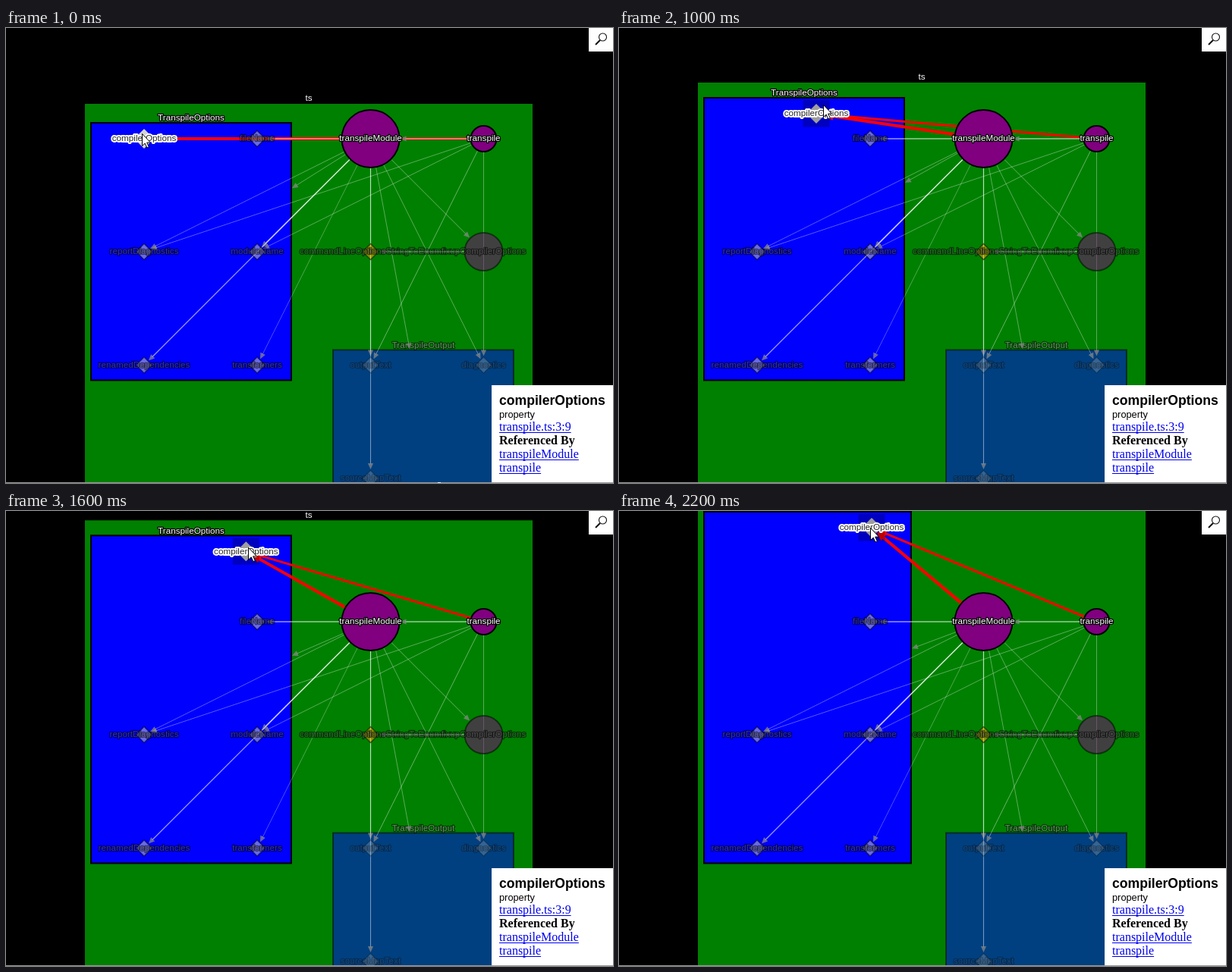
Recreate the animation shown at these times as an HTML page with a canvas. Size 800 by 600 pixels, loop 2.7 s.

```html
<!DOCTYPE html>
<html lang="en">
<head>
<meta charset="utf-8">
<title>Dependency graph</title>
<style>
  html, body { margin: 0; width: 800px; height: 600px; overflow: hidden; background: #000; }
  canvas { display: block; }
</style>
</head>
<body>
<canvas id="stage" width="800" height="600"></canvas>
<script>
const ctx = document.getElementById('stage').getContext('2d');
const SANS = '"Liberation Sans", Arial, sans-serif';
const SERIF = '"Liberation Serif", "Times New Roman", serif';
const LOOP = 2700, STEP = 100;

// time, dragged node x/y, pointer x/y
const KEYS = [
  [0, 182, 146, 179, 139], [200, 182, 146, 180, 147], [600, 182, 146, 180, 147],
  [1000, 260, 113, 269, 101], [1100, 260, 113, 269, 101], [1200, 274, 98, 288, 79],
  [1400, 309, 63, 313, 57], [1500, 309, 63, 313, 57], [1800, 331, 34, 331, 29],
  [1900, 331, 34, 331, 29], [2200, 333, 22, 331, 22], [LOOP, 333, 22, 331, 22]
];

const COL = [182, 331, 480.5, 629.5], ROW = [146, 295, 444.5, 594];
const circle = (label, c, r, size, alpha = 1) =>
  ({ label, x: COL[c], y: ROW[r], size, alpha, fill: 'purple', round: true });
const diamond = (label, c, r, alpha = 0.5, fill = 'lightgrey') =>
  ({ label, x: COL[c], y: ROW[r], size: 10.5, alpha, fill });

const dragged = diamond('compilerOptions', 0, 0, 1);
const fileName = diamond('fileName', 1, 0);
const report = diamond('reportDiagnostics', 0, 1);
const moduleName = diamond('moduleName', 1, 1);
const renamed = diamond('renamedDependencies', 0, 2);
const transformers = diamond('transformers', 1, 2);
const outputText = diamond('outputText', 2, 2, 0.25);
const diagnostics = diamond('diagnostics', 3, 2, 0.25);
const sourceMap = diamond('sourceMapText', 2, 3, 0.25);
const enumMap = diamond('commandLineOptionsStringToEnum', 2, 1, 0.5, 'orange');
const fixup = circle('fixupCompilerOptions', 3, 1, 25, 0.5);
const main = circle('transpileModule', 2, 0, 38);
const transpile = circle('transpile', 3, 0, 17);
const nodes = [fileName, report, moduleName, renamed, transformers, outputText,
  diagnostics, sourceMap, enumMap, fixup, main, transpile];

const options = { label: 'TranspileOptions', left: 112, bottom: 464.5 };
const output = { label: 'TranspileOutput', left: 431, right: 669, top: 424.5, bottom: 615 };

// from, to, line opacity, line width
const edges = [
  [main, fileName, 0.6, 1.3], [main, report, 0.35, 1], [main, moduleName, 0.65, 1.3],
  [main, renamed, 0.6, 1.2], [main, transformers, 0.3, 1], [main, options, 0.35, 1],
  [main, outputText, 0.5, 1.2], [main, sourceMap, 0.45, 1.1], [main, output, 0.35, 1],
  [main, diagnostics, 0.35, 1], [main, fixup, 0.4, 1], [transpile, main, 0.6, 1.3],
  [transpile, report, 0.35, 1], [transpile, moduleName, 0.35, 1],
  [transpile, outputText, 0.4, 1], [transpile, diagnostics, 0.35, 1],
  [fixup, enumMap, 0.45, 2]
];

function pose(t) {
  const i = KEYS.findIndex(k => k[0] > t), a = KEYS[i - 1], b = KEYS[i];
  const p = (t - a[0]) / (b[0] - a[0]);
  return a.map((v, j) => v + (b[j] - v) * p);
}

function label(text, x, y, alpha = 1, ink = 1, fill = '#fff', halo = '#000', width = 2.4) {
  ctx.font = `11.7px ${SANS}`;
  ctx.textAlign = 'center';
  ctx.textBaseline = 'middle';
  ctx.lineJoin = 'round';
  ctx.lineWidth = width;
  ctx.strokeStyle = halo;
  ctx.fillStyle = fill;
  ctx.globalAlpha = alpha;
  ctx.strokeText(text, x, y);
  ctx.globalAlpha = alpha * ink;
  ctx.fillText(text, x, y);
  ctx.globalAlpha = 1;
}

function drawGroup(g, alpha) {
  ctx.globalAlpha = alpha;
  ctx.fillStyle = '#00f';
  ctx.strokeStyle = '#000';
  ctx.lineWidth = 2;
  ctx.lineJoin = 'miter';
  ctx.fillRect(g.left, g.top, g.right - g.left, g.bottom - g.top);
  ctx.strokeRect(g.left, g.top, g.right - g.left, g.bottom - g.top);
  label(g.label, (g.left + g.right) / 2, g.top - 6, alpha, alpha < 1 ? 0.8 : 1);
}

function polygon(points) {
  ctx.beginPath();
  points.forEach(([x, y]) => ctx.lineTo(x, y));
  ctx.closePath();
}

// Distance from a shape's centre to its rim along a unit direction
function rim(s, ux, uy) {
  if (s.left) return Math.min((s.right - s.left) / 2 / Math.abs(ux), (s.bottom - s.top) / 2 / Math.abs(uy)) + 1;
  return s.round ? s.size + 1 : (s.size + 1.5) / (Math.abs(ux) + Math.abs(uy));
}

function drawEdge(from, to, color, alpha, width, headColor, head) {
  const tx = to.left ? (to.left + to.right) / 2 : to.x;
  const ty = to.left ? (to.top + to.bottom) / 2 : to.y;
  const dx = tx - from.x, dy = ty - from.y, d = Math.hypot(dx, dy);
  const ux = dx / d, uy = dy / d;
  const start = rim(from, ux, uy), end = d - rim(to, ux, uy);
  const at = (s, side = 0) => [from.x + ux * s - uy * side, from.y + uy * s + ux * side];
  ctx.globalAlpha = alpha;
  ctx.strokeStyle = color;
  ctx.lineWidth = width;
  ctx.beginPath();
  ctx.moveTo(...at(start));
  ctx.lineTo(...at(end - head * 0.8));
  ctx.stroke();
  ctx.globalAlpha = Math.max(alpha, 0.75);
  ctx.fillStyle = headColor;
  polygon([at(end), at(end - head, head * 0.45), at(end - head, -head * 0.45)]);
  ctx.fill();
  ctx.globalAlpha = 1;
}

function nodePath({ x, y, round }, r) {
  if (round) {
    ctx.beginPath();
    ctx.arc(x, y, r, 0, 7);
  } else polygon([[x, y - r], [x + r, y], [x, y + r], [x - r, y]]);
}

function drawNode(n) {
  ctx.globalAlpha = n.alpha;
  ctx.fillStyle = n.fill;
  ctx.strokeStyle = '#000';
  ctx.lineWidth = n.round ? 2 : 1.5;
  ctx.lineJoin = 'miter';
  nodePath(n, n.size);
  ctx.fill();
  ctx.stroke();
  label(n.label, n.x, n.y, n.alpha, n.alpha < 1 ? 0.4 : 1);
}

function drawDragged(active) {
  const { x, y } = dragged;
  ctx.fillStyle = dragged.fill;
  nodePath(dragged, 13);
  ctx.fill();
  if (active) {
    ctx.fillStyle = 'rgba(0,0,0,.25)';
    ctx.fillRect(x - 17.5, y - 17.5, 35, 35);
  }
  label(dragged.label, x, y, 1, 0.85, '#000', '#fff', 4);
}

function panelText(text, baseline, font, link) {
  ctx.font = font;
  ctx.fillStyle = link ? '#00e' : '#000';
  ctx.fillText(text, 650, baseline);
  if (link) ctx.fillRect(650, baseline + 2, ctx.measureText(text).width, 1);
}

function drawPanels() {
  ctx.fillStyle = '#fff';
  ctx.fillRect(640, 471, 160, 128);
  ctx.fillRect(768, 0, 32, 31);
  ctx.textAlign = 'left';
  ctx.textBaseline = 'alphabetic';
  panelText('compilerOptions', 497, `bold 17.6px ${SANS}`);
  panelText('property', 514, `12.8px ${SANS}`);
  panelText('transpile.ts:3:9', 531, `16px ${SERIF}`, true);
  panelText('Referenced By', 549, `bold 16px ${SERIF}`);
  panelText('transpileModule', 567, `16px ${SERIF}`, true);
  panelText('transpile', 585, `16px ${SERIF}`, true);

  ctx.strokeStyle = '#111';
  ctx.lineWidth = 1.1;
  ctx.beginPath();
  ctx.arc(786.5, 12, 5, 0, 7);
  ctx.stroke();
  ctx.lineWidth = 2;
  ctx.beginPath();
  ctx.moveTo(783, 16);
  ctx.lineTo(777, 22);
  ctx.stroke();
}

function drawPointer(x, y) {
  ctx.save();
  ctx.translate(x + 0.5, y + 0.5);
  polygon([[0, 0], [0, 16], [3.7, 12.6], [6.4, 18.5], [8.8, 17.4], [6.2, 11.6], [11, 11.6]]);
  ctx.fillStyle = '#fff';
  ctx.strokeStyle = '#000';
  ctx.lineWidth = 1;
  ctx.fill();
  ctx.stroke();
  ctx.restore();
}

function draw(now) {
  const t = Math.floor(now % LOOP / STEP) * STEP;
  const [, x, y, px, py] = pose(t);
  Object.assign(dragged, { x, y });
  options.top = y - 21;
  options.right = Math.max(376, x + 52);
  const top = Math.min(100, y - 41);

  ctx.fillStyle = '#000';
  ctx.fillRect(0, 0, 800, 600);
  ctx.fillStyle = 'green';
  ctx.fillRect(104, top, 590, 600 - top);
  label('ts', 399, top - 7);
  drawGroup(options, 1);
  drawGroup(output, 0.5);

  drawEdge(main, dragged, 'red', 1, 4, 'red', 12);
  drawEdge(transpile, dragged, 'red', 1, 3, 'red', 11);
  for (const [from, to, alpha, width] of edges)
    drawEdge(from, to, '#fff', alpha, width, '#888', 8);
  nodes.forEach(drawNode);
  drawDragged(t > 600);

  ctx.fillStyle = '#999';
  ctx.fillRect(0, 599, 800, 1);
  if (t < 600) {
    ctx.fillStyle = '#fff';
    ctx.fillRect(569, 599, 4, 1);
  }
  drawPanels();
  drawPointer(px, py);
  requestAnimationFrame(draw);
}

requestAnimationFrame(draw);
</script>
</body>
</html>
```
